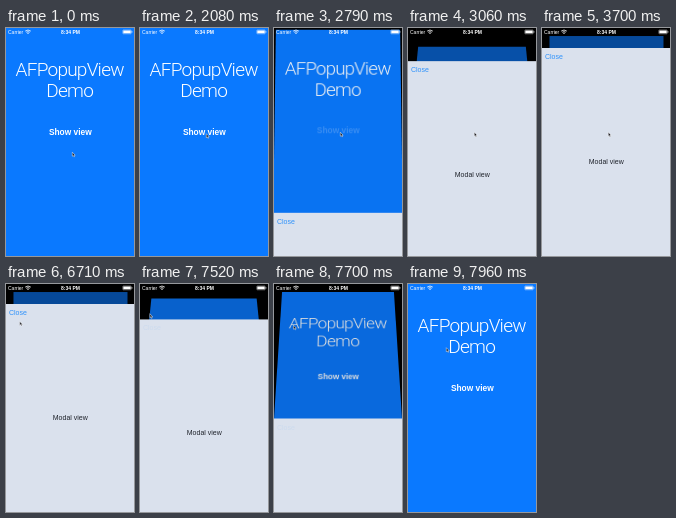
These frames come from a looping animation (128 by 228 pixels, 8000 ms). An HTML page:

```html
<!DOCTYPE html>
<html lang="en">
<head>
<meta charset="utf-8">
<title>AFPopupView Demo</title>
<style>
  html, body { margin: 0; width: 100%; height: 100%; overflow: hidden; background: #000; }
  #stage { position: relative; width: 128px; height: 228px; overflow: hidden; background: #000; }
  svg { position: absolute; left: 0; top: 0; width: 128px; height: 228px; display: block; }
  text { font-family: "Liberation Sans", Arial, sans-serif; }
  .title { font: 300 19px Roboto, Lato, sans-serif; letter-spacing: -.75px; }
  .mid { text-anchor: middle; }
</style>
</head>
<body>
<div id="stage">
  <svg id="page" viewBox="0 0 128 228">
    <rect width="128" height="228" fill="#0a79ff"/>
    <g fill="#fff" class="mid">
      <text class="title" x="63.7" y="47.5">AFPopupView</text>
      <text class="title" x="63.7" y="69">Demo</text>
      <text id="show" x="64.3" y="107" font-size="8.4" font-weight="bold">Show view</text>
    </g>
    <rect id="dim" width="128" height="228" fill="#000"/>
  </svg>
  <svg viewBox="0 0 128 228">
    <g id="modal">
      <rect width="128" height="228" fill="#dae1ed"/>
      <text id="close" x="3" y="11" font-size="7" fill="#2f92fb">Close</text>
      <text class="mid" x="64.3" y="116" font-size="7" fill="#20242c">Modal view</text>
    </g>
    <g fill="#fff">
      <text x="2" y="5.6" font-size="5">Carrier</text>
      <g fill="none" stroke="#fff" stroke-width=".8">
        <path d="M19.2 3.1Q22 .9 24.8 3.1M20.3 4.3Q22 3 23.7 4.3"/>
      </g>
      <path d="M21 5.1Q22 4.3 23 5.1L22 6.1Z"/>
      <text class="mid" x="64.5" y="5.6" font-size="5" font-weight="bold">8:34 PM</text>
      <rect x="116.8" y="2" width="8.4" height="3.8" rx=".6" fill="none" stroke="#fff" stroke-width=".4"/>
      <rect x="117.3" y="2.5" width="7.4" height="2.8" rx=".3"/>
      <rect x="125.6" y="3.2" width=".7" height="1.4"/>
    </g>
    <path id="cursor" d="M.3 .2V4.2L1.2 3.4L1.9 4.9L2.6 4.6L2 3.2H3.2Z"
      fill="#1c1c22" stroke="#fff" stroke-width=".45"/>
  </svg>
</div>
<script>
const LOOP = 8000, OPEN = 2617, CLOSE = 7417, SLIDE = 540;
const $ = id => document.getElementById(id);
const clamp = v => Math.min(1, Math.max(0, v));
const linear = u => u;
const easeIn = u => u * u;
const easeOut = u => 1 - (1 - u) * (1 - u);
const easeInOut = u => u < .5 ? 2 * u * u : 1 - 2 * (1 - u) * (1 - u);

// Each key: [time, values, easing used to reach it]
function track(keys, t) {
  if (t <= keys[0][0]) return keys[0][1];
  for (let i = 1; i < keys.length; i++) {
    const [end, to, ease = linear] = keys[i];
    if (t > end) continue;
    const [start, from] = keys[i - 1];
    const u = ease((t - start) / (end - start));
    return from.map((v, k) => v + (to[k] - v) * u);
  }
  return keys[keys.length - 1][1];
}

const pointer = [
  [1110, [66, 124]], [1980, [66, 106]], [2380, [66, 104]], [4410, [66, 104]],
  [5310, [47, 77]], [6210, [19, 45]], [7110, [9, 31]], [7420, [9, 30]],
  [7520, [9.5, 29.5]], [7960, [38, 63.5], easeInOut]
];

// tilt in degrees, scale, upward shift, shade
const flat = [0, 1, 0, 0], rest = [0, .883, 5.3, .4];
const pose = [
  [OPEN, flat], [3060, [30, .97, 12, .34], easeIn], [3400, rest, easeOut],
  [CLOSE, rest], [7520, [31, .95, 19, .2], easeOut], [7957, flat, easeInOut]
];

function draw(t) {
  const [tilt, scale, lift, shade] = track(pose, t);
  $("page").style.transform =
    `translateY(${-lift}px) perspective(360px) rotateX(${tilt}deg) scale(${scale})`;
  $("dim").setAttribute("opacity", shade);
  $("show").setAttribute("opacity", t > 2590 && t < 3400 ? .2 : 1);

  const shown = easeInOut(clamp((t - OPEN) / SLIDE)) - easeInOut(clamp((t - CLOSE) / SLIDE));
  $("modal").setAttribute("transform", `translate(0 ${228 - 208 * shown})`);
  $("close").setAttribute("opacity", t >= 7230 ? .08 : 1);

  const [x, y] = track(pointer, t);
  $("cursor").setAttribute("transform", `translate(${x} ${y})`);
}

const began = performance.now();
function tick() {
  draw((performance.now() - began) % LOOP);
  requestAnimationFrame(tick);
}
tick();
</script>
</body>
</html>
```
